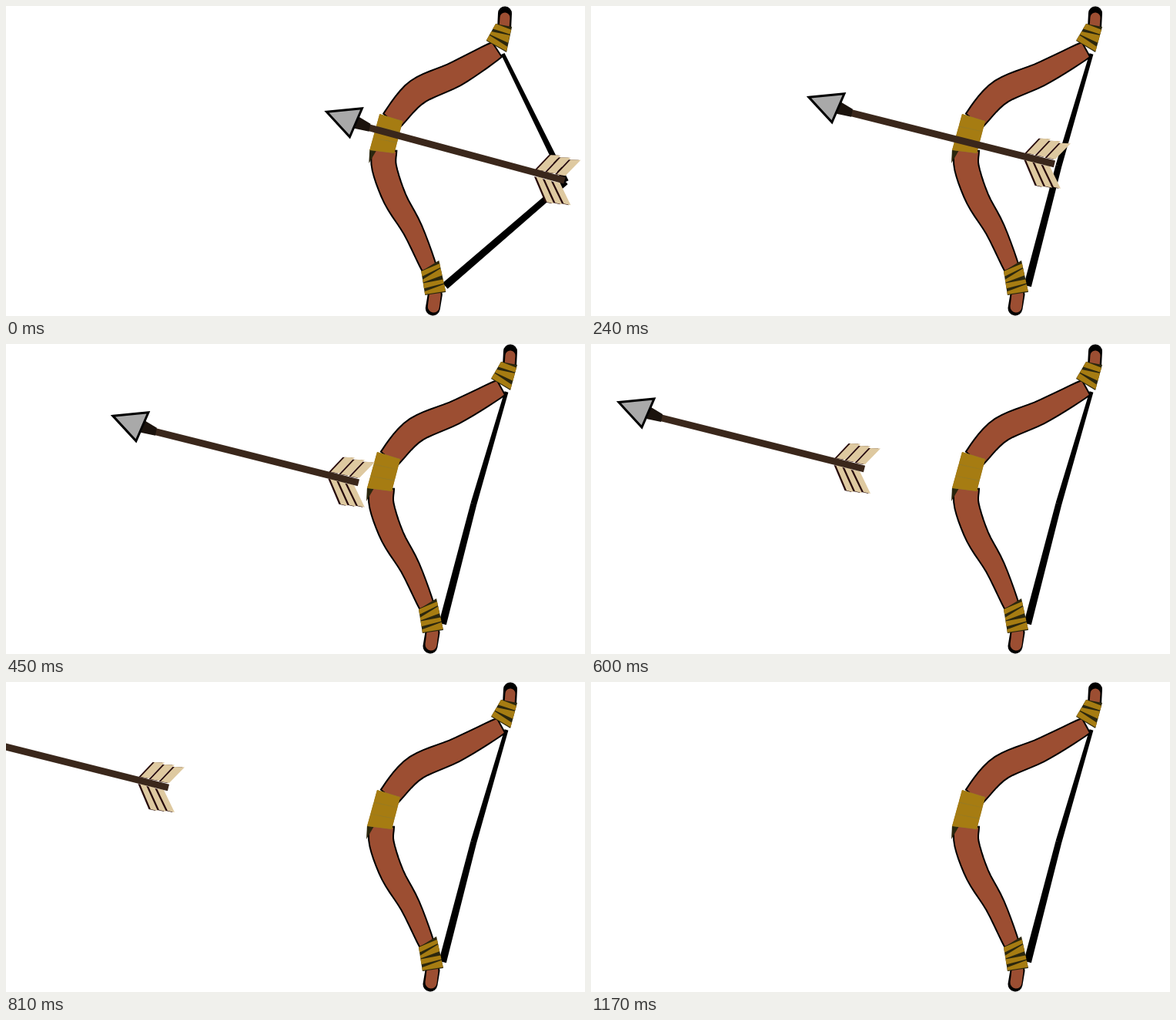
Animation of 752 by 402 pixels, one loop 1200 ms. Source, as an HTML page:

```html
<!DOCTYPE html>
<html lang="en">
<head>
<meta charset="utf-8">
<title>Bow and arrow</title>
<style>
  html, body { margin: 0; width: 100%; height: 100%; overflow: hidden; background: #fff; }
  svg { display: block; width: 100vw; height: 100vh; }
</style>
</head>
<body>
<svg viewBox="0 0 752 402">
  <g id="bow"><path id="string"/></g>
  <g id="tail"></g>
  <path id="shaft" fill="#3a271b"/>
  <g id="head">
    <path fill="#1b130d" d="M78 82 93 91 91 101 72 97Z"/>
    <path fill="#a9a9a9" stroke="#000" stroke-width="3" d="M36 75.500 82 71 66 108Z"/>
  </g>
</svg>
<script>
const LOOP = 1200, STEP = 30;
const BROWN = "#9c4e32", GOLD = "#a67c12", DARK = "#2b270e";
const CREAM = "#dec9a0", MAROON = "#26090a";

const $ = id => document.getElementById(id);
const lerp = (a, b, k) => a + (b - a) * k;
const clamp = v => Math.min(1, Math.max(0, v));
const mix = (p, q, k) => [lerp(p[0], q[0], k), lerp(p[1], q[1], k)];
const plus = (p, q) => [p[0] + q[0], p[1] + q[1]];
const poly = pts => "M" + pts.map(p => p.map(v => v.toFixed(2)).join(" ")).join("L") + "Z";

function path(parent, pts, attrs) {
  const el = document.createElementNS("http://www.w3.org/2000/svg", "path");
  el.setAttribute("d", poly(pts));
  for (const name in attrs) el.setAttribute(name, attrs[name]);
  $(parent).append(el);
  return el;
}

// Catmull-Rom position on an open run of points, u from 0 to 1
function along(pts, u) {
  const n = pts.length - 1, i = Math.min(n - 1, Math.floor(u * n)), s = u * n - i;
  const b = pts[i], c = pts[i + 1], a = pts[i - 1] || b, d = pts[i + 2] || c;
  return [0, 1].map(k => b[k] + 0.5 * s * (c[k] - a[k] +
    s * (2 * a[k] - 5 * b[k] + 4 * c[k] - d[k] + s * (3 * (b[k] - c[k]) + d[k] - a[k]))));
}

// Outline of a band around a spine; width(u) is its thickness
function ribbon(spine, width, steps = 1) {
  const left = [], right = [];
  for (let i = 0; i <= steps; i++) {
    const u = i / steps, p = along(spine, u);
    const a = along(spine, Math.max(0, u - 0.02)), b = along(spine, Math.min(1, u + 0.02));
    const dx = b[0] - a[0], dy = b[1] - a[1], r = width(u) / 2 / Math.hypot(dx, dy);
    left.push([p[0] - dy * r, p[1] + dx * r]);
    right.unshift([p[0] + dy * r, p[1] - dx * r]);
  }
  return left.concat(right);
}

const bowParts = [];
const part = (pts, attrs) => bowParts.push({ el: path("bow", pts, attrs), pts });

// Limb that tapers from w0 to w1 and swells in the middle
const limb = (spine, w0, w1, swell) =>
  part(ribbon(spine, u => lerp(w0, w1, u) + swell * Math.sin(Math.PI * u), 20),
    { fill: BROWN, stroke: "#000", "stroke-width": 4, "paint-order": "stroke" });

const rod = (a, b, stroke, width) =>
  part([a, b], { stroke, "stroke-width": width, "stroke-linejoin": "round" });

// Gold binding of n turns, the gaps opening on alternate sides
function wrap([tl, tr, br, bl], n, gap, back) {
  part([tl, tr, br, bl], { fill: back });
  for (let i = 0; i < n; i++) {
    const l = (i + gap * (i % 2)) / n, r = (i + gap * (1 - i % 2)) / n, end = (i + 1 - gap / 3) / n;
    part([mix(tl, bl, l), mix(tr, br, r), mix(tr, br, end), mix(tl, bl, end)], { fill: GOLD });
  }
}

limb([[498, 148], [531, 112], [585, 88], [642, 57]], 26, 20, 7);
limb([[488, 188], [488, 210], [502, 250], [525, 290], [546, 339]], 30, 18, 4);
rod([655, 9.5], [654, 28], "#000", 18);
rod([655, 15], [654, 28], BROWN, 13);
rod([554, 374], [551, 392], "#000", 19);
rod([554, 374], [552, 390], BROWN, 15);
part([[469, 186], [478, 187], [468, 204]], { fill: DARK });
wrap([[643, 23], [664, 27], [655, 60], [630, 45]], 3, 0.35, DARK);
wrap([[482, 140], [512, 149], [501, 191], [469, 187]], 3, 0.04, "#8f7a2c");
wrap([[536, 344], [559, 330], [568, 371], [541, 375]], 4, 0.4, DARK);

// Feather barbs: slanted strips, each with a dark left edge
function barb(base, reach, root, tip) {
  const end = plus(base, reach);
  const pts = [base, end, plus(end, tip), plus(base, root)];
  path("tail", pts.map(p => plus(p, [-2.5, 0])), { fill: MAROON });
  path("tail", pts, { fill: CREAM });
}
for (let i = 0; i < 3; i++) {
  barb([319 + 13 * i, 148 + 3 * i], [18, -19], [11, 2], [13, 0.5]);
  barb([318 + 11 * i, 157 + 3 * i], [14, 33 - 2 * i], [9, 2], [9, 2]);
}

// Sideways flex of the bow at full draw
const flex = y => 3.3 - 10.3 * Math.exp(-((y / 88) ** 4));
const bend = ([x, y], k) => [x + flex(y) * k, y];
const move = (id, x, y) => $(id).setAttribute("transform", `translate(${x} ${y})`);

function draw(t) {
  // the arrow gathers speed during the first 120 ms, then flies evenly
  const run = 600 - (t < 120 ? 60 + t * t / 240 : t);
  const x = run * 0.686, y = run * 0.119;
  const slip = clamp(1 - t / 120);
  const hx = x + 10 * slip, hy = y - 2.5 * slip;
  move("tail", x, y);
  move("head", hx, hy);
  $("shaft").setAttribute("d", poly(ribbon([[80 + hx, 93 + hy], [355 + x, 162 + y]], () => 9)));

  // the string follows the nock until it is straight
  const pull = clamp((356 + x - 609) / 117);
  for (const p of bowParts) p.el.setAttribute("d", poly(p.pts.map(q => bend(q, pull))));
  const mid = mix([607.5, 207], [727, 228], pull);
  $("string").setAttribute("d",
    poly(ribbon([bend([650, 62], pull), mid], u => lerp(5, 8, u))) +
    poly(ribbon([mid, bend([567, 363], pull)], u => lerp(8, 10, u))));
}

function tick(now) {
  draw(Math.floor(now % LOOP / STEP) * STEP);
  requestAnimationFrame(tick);
}
draw(0);
requestAnimationFrame(tick);
</script>
</body>
</html>
```
